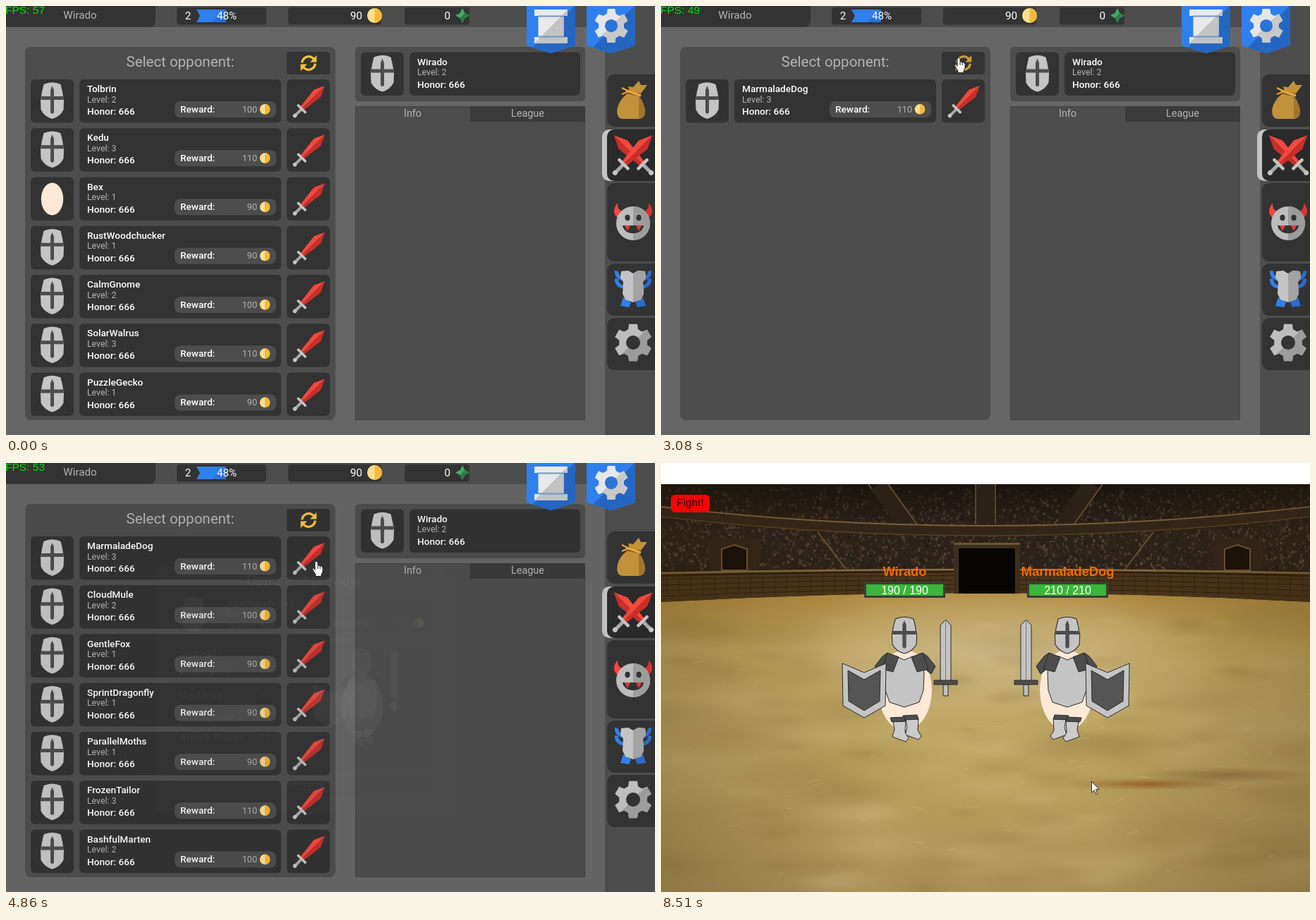
These frames come from a looping animation (920 by 608 pixels, 8590 ms). An HTML page with a canvas:

```html
<!DOCTYPE html>
<html lang="en">
<head>
<meta charset="utf-8">
<title>Arena</title>
<style>
html, body { margin: 0; width: 100%; height: 100%; overflow: hidden; background: #666; }
canvas { display: block; width: 920px; height: 608px; }
</style>
</head>
<body>
<canvas id="stage" width="920" height="608"></canvas>
<script>
const LOOP = 8590, TAU = Math.PI * 2;
const CLEAR = 2700, REFILL = 3080, OPEN = 4800, FIGHT = 7810;
const ROBOTO = 'Roboto, sans-serif', ARIAL = '"Liberation Sans", Arial, sans-serif';
const DARK = '#333', MID = '#4d4d4d', BASE = '#666', STEEL = '#c4c4c4', SOFT = '#b3b3b3', CREAM = '#fde9d6';
const RED = '#f4493d', BLUE = '#2f80ed', DEEP = '#2566c2';
const HERO = 'Wirado';

const roster = text => text.split(' ').map(entry => {
  const [name, level] = entry.split(':');
  return { name, level: +level };
});
const listA = roster('Tolbrin:2 Kedu:3 Bex:1 RustWoodchucker:1 CalmGnome:2 SolarWalrus:3 PuzzleGecko:1');
const listB = roster('MarmaladeDog:3 CloudMule:2 GentleFox:1 SprintDragonfly:1 ParallelMoths:1 FrozenTailor:3 BashfulMarten:2');
listA[2].egg = true;
const foe = listB[0];
const stats = { Strength: 5, Endurance: 11, Dexterity: 11, Intelligence: 7, 'Attack Power': 25, Health: 210 };

// Pointer glides: start, end, goal x, goal y, sideways bow
const glides = [
  [520, 1230, 546, 443, 0], [1230, 1530, 480, 247, 0], [1770, 2470, 422, 73, 0], [3880, 4630, 440, 139, 4],
  [5720, 6020, 480, 162, 0], [6020, 6660, 458, 352, 28], [6820, 7500, 480, 456, 8], [8060, 8510, 610, 451, 0]
];
const rates = [[0, 57], [1690, 50], [3080, 49], [4780, 53], [6020, 41], [7730, 38], [LOOP, 38]];

const view = document.getElementById('stage').getContext('2d');
let c = view;

function box(x, y, w, h, fill, r = 0) {
  c.fillStyle = fill;
  c.beginPath();
  c.roundRect(x, y, w, h, r);
  c.fill();
}
function txt(s, x, y, size, color = '#fff', align = 'left', font = ROBOTO, weight = 400) {
  c.font = `${weight} ${size}px ${font}`;
  c.textAlign = align;
  c.fillStyle = color;
  c.fillText(s, x, y);
}
const strong = (s, x, y, size = 13.6) => txt(s, x, y, size, '#fff', 'left', ROBOTO, 500);
function shape(...p) {
  c.beginPath();
  for (let i = 0; i < p.length; i += 2) c.lineTo(p[i], p[i + 1]);
  c.closePath();
}
// Symmetric path about x, from the points of its right half
function sym(x, ...half) {
  c.beginPath();
  for (let i = 0; i < half.length; i += 2) c.lineTo(x + half[i], half[i + 1]);
  for (let i = half.length - 2; i >= 0; i -= 2) c.lineTo(x - half[i], half[i + 1]);
  c.closePath();
}
function paint(fill) {
  c.fillStyle = fill;
  c.fill();
}
function ink(fill) {
  paint(fill);
  c.strokeStyle = '#2b2b2b';
  c.lineWidth = 1;
  c.stroke();
}
function poly(fill, ...p) {
  shape(...p);
  paint(fill);
}
function oval(x, y, rx, ry, fill) {
  c.beginPath();
  c.ellipse(x, y, rx, ry, 0, 0, TAU);
  paint(fill);
}
function line(color, w, ...p) {
  c.strokeStyle = color;
  c.lineWidth = w;
  c.beginPath();
  for (let i = 0; i < p.length; i += 2) c.lineTo(p[i], p[i + 1]);
  c.stroke();
}
function at(x, y, sx, sy, draw, turn = 0) {
  c.save();
  c.translate(x, y);
  c.scale(sx, sy);
  c.rotate(turn);
  draw();
  c.restore();
}
// Fill the path light, then its part right of x dark; lean slants the border.
function twoTone(light, dark, x, y, lean = 0) {
  c.save();
  paint(light);
  c.clip();
  poly(dark, x + 80 * lean, y - 80, x + 160, y - 80, x + 160, y + 80, x - 80 * lean, y + 80);
  c.restore();
}

function coin(x, y, r) {
  c.beginPath();
  c.arc(x, y, r, 0, TAU);
  twoTone('#ffdf8c', '#f6b93b', x, y);
}
function helm(outline) {
  c.beginPath();
  c.moveTo(-12, 3);
  c.quadraticCurveTo(0, -2.5, 12, 3);
  c.quadraticCurveTo(15, 14, 16.5, 26);
  c.lineTo(16, 39);
  c.quadraticCurveTo(11, 49, 0, 52);
  c.quadraticCurveTo(-11, 49, -16, 39);
  c.lineTo(-16.5, 26);
  c.quadraticCurveTo(-15, 14, -12, 3);
  c.closePath();
  if (outline === true) ink(STEEL);
  else paint(STEEL);
  sym(0, 15.5, 20, 16.3, 25);
  paint(MID);
  sym(0, 0, 5, 2.5, 11, 2.5, 43, 0, 45);
  paint(MID);
}
// Blade along the x axis, turned to point up right
function sword() {
  at(11.5, 51.5, 1, 1, () => {
    poly(RED, 15, 0, 15, -3.5, 45, -7, 60, 0);
    poly('#c92f2a', 15, 0, 15, 3.5, 45, 7, 60, 0);
    box(0, -2, 14, 4, '#a9a9a9', 1);
    box(12, -8.5, 3.5, 17, STEEL, 1);
    oval(0, 0, 2.8, 2.8, STEEL);
  }, -TAU / 8);
}
function gear(x, y, r, light, dark, hole) {
  c.beginPath();
  for (let i = 0; i < 6; i++) {
    const a = i * TAU / 6 - TAU / 4;
    for (const [da, k] of [[-0.36, 0.74], [-0.22, 1], [0.22, 1], [0.36, 0.74]])
      c.lineTo(x + Math.cos(a + da) * r * k, y + Math.sin(a + da) * r * k);
  }
  c.closePath();
  twoTone(light, dark, x, y, 1);
  oval(x, y, r * 0.37, r * 0.37, hole);
}
function ribbon(x) {
  sym(x, 34.5, 0, 34.5, 56, 0, 67);
  twoTone(BLUE, DEEP, x, 33, 1);
}
function refresh(x, y) {
  for (const turn of [0, Math.PI]) at(x, y, 1.08, 1.08, () => {
    c.strokeStyle = '#f8c23c';
    c.lineWidth = 3;
    c.beginPath();
    c.arc(0, 0, 8.6, Math.PI * 1.02, Math.PI * 1.78);
    c.stroke();
    poly('#f8c23c', 10.5, -10.5, 10.5, -1.5, 2, -1.5);
  }, turn);
}

function person(x, y, name, level) {
  strong(name, x, y + 18);
  txt('Level: ' + level, x, y + 32.5, 12.3, SOFT);
  strong('Honor: 666', x, y + 50);
}
function card(x, y, w, name, level, egg) {
  box(x, y, 61, 61.5, DARK, 6);
  if (egg) oval(x + 30.5, y + 31, 15.7, 23, CREAM);
  else at(x + 30.5, y + 4, 1, 1, helm);
  box(x + 69, y, w, 61.5, DARK, 6);
  person(x + 80, y, name, level);
}
function reward(x, y, level, size) {
  const k = size > 14 ? 1 : 0;
  box(x, y, 144, 23, MID, 8);
  strong('Reward:', x + 8, y + 15.5, size);
  txt(80 + level * 10, x + 117 + k * 2, y + 15.5, size - 1 + k, SOFT, 'right');
  coin(x + 128 + k * 2, y + 11.3, 7.2);
}
function row(y, who) {
  card(35, y, 286, who.name, who.level, who.egg);
  box(398, y, 61, 61.5, DARK, 6);
  reward(239, y + 31, who.level, 13.6);
  at(398, y, 1, 1, sword);
}

function topBar() {
  box(0, 0, 920, 30, MID);
  box(-10, -10, 222, 39.5, DARK, 8);
  txt(HERO, 105, 18, 15.2, SOFT, 'center');
  for (const [x, w] of [[242, 127], [400, 132], [565, 92]]) box(x, 2, w, 24.5, DARK, 4);
  shape(270, 5, 312, 5, 312, 23, 270, 23, 275, 14);
  twoTone(BLUE, '#2871d6', 301, 14, 1);
  txt('2', 258, 18.5, 15.2, '#fff', 'center');
  txt('48%', 313, 18.5, 15.2, '#fff', 'center');
  txt('90', 505, 18.5, 15.2, '#fff', 'right');
  txt('0', 630, 18.5, 15.2, '#fff', 'right');
  coin(522.5, 13.5, 10.5);
  sym(647, 0, 3, 3.5, 10, 10, 13.5, 3.5, 17, 0, 24);
  twoTone('#43a968', '#2c7d4b', 647, 13.5, 1);
  ribbon(772.5);
  sym(772.5, 23.5, 5, 23.5, 14, 18, 14, 18, 44, 23.5, 44, 23.5, 53);
  twoTone('#e9e9e9', '#c3c3c3', 772.5, 29, 1);
  for (const y of [14.5, 43.5]) line('#6f95cc', 2, 754, y, 791, y);
  ribbon(857.5);
  gear(858, 28, 24.5, '#e6e6e6', '#c8c8c8', '#2b74d8');
}

function bag() {
  c.beginPath();
  c.moveTo(881, 124);
  c.bezierCurveTo(864, 136, 861, 160, 875, 160);
  c.lineTo(897, 160);
  c.bezierCurveTo(911, 159, 906, 138, 897, 128);
  c.closePath();
  twoTone('#c1923a', '#a2762a', 897, 140);
  poly('#c1923a', 884, 121, 882, 114, 889, 115, 897, 106, 900, 112, 909, 112, 900, 124);
  line('#f0a435', 3.5, 879, 120, 900, 127);
  line('#f0a435', 2, 873, 125, 883, 121, 873, 116);
}
function devil() {
  for (const s of [1, -1]) at(889, 0, s, 1, () => {
    c.beginPath();
    c.moveTo(13, 292);
    c.quadraticCurveTo(23, 290, 22, 279);
    c.quadraticCurveTo(33, 293, 20, 302);
    c.closePath();
    paint(s > 0 ? '#d5352f' : RED);
  });
  c.beginPath();
  c.arc(889, 308, 24, 0, TAU);
  twoTone('#bdbdbd', '#9c9c9c', 889, 308);
  c.beginPath();
  c.moveTo(874, 311);
  c.lineTo(904, 311);
  c.bezierCurveTo(902, 326, 876, 326, 874, 311);
  paint(DARK);
  for (const s of [-1, 1]) {
    const x = 889 + s * 8;
    oval(x, 300, 3.6, 4.2, DARK);
    poly('#e53b33', x - 4, 311, x + 4, 311, x, 319);
  }
}
function armor() {
  for (const s of [1, -1]) at(889, 0, s, 1, () => {
    const blue = s > 0 ? '#2a6bcc' : BLUE;
    for (const y of [375, 386]) {
      c.beginPath();
      c.moveTo(26, y);
      c.quadraticCurveTo(27, y + 12, 13, y + 15);
      c.lineTo(13, y + 10);
      c.quadraticCurveTo(21, y + 8, 21, y + 1);
      paint(blue);
    }
    poly(blue, 3, 420, 14, 413, 18, 425, 6, 427);
  });
  sym(889, 0, 379, 7, 375, 17, 376, 18, 385, 14, 391, 15, 408, 11, 416, 0, 420);
  twoTone('#c4c4c4', '#a3a3a3', 889, 398);
}
function sideBar() {
  box(849, 30, 71, 578, MID);
  box(845, 175, 90, 73, STEEL, 10);
  for (const [y, h] of [[97, 74], [175, 73], [251, 111], [365, 74], [442, 74]])
    box(852, y, 90, h, h === 73 ? '#2a2a2a' : DARK, 10);
  bag();
  for (const s of [-1, 1]) at(889 - s * 40, 172, s * 1.25, 1.25, sword);
  devil();
  armor();
  gear(889, 477, 27, '#bdbdbd', '#9c9c9c', DARK);
}

function lobby(rows, hover) {
  box(0, 0, 920, 608, BASE);
  sideBar();
  box(27, 58, 440, 529, MID, 8);
  txt('Select opponent:', 247, 86, 20.5, SOFT, 'center');
  box(398, 65, 61, 32, DARK, 4);
  c.globalAlpha = hover ? 0.75 : 1;
  refresh(429, 81);
  c.globalAlpha = 1;
  rows.forEach((who, i) => row(104 + i * 69.25, who));
  box(495, 58, 326, 77, MID, 6);
  card(503, 65.5, 242, HERO, 2);
  box(495, 142, 326, 444.5, MID);
  c.strokeStyle = '#444';
  c.lineWidth = 1;
  c.strokeRect(495.5, 142.5, 325, 444);
  box(658, 142, 163, 22, '#3b3b3b');
  txt('Info', 576.5, 157, 14.4, SOFT, 'center');
  txt('League', 739.5, 157, 14.4, SOFT, 'center');
}

function knight(hand) {
  oval(1, 104, 38, 57, CREAM);
  sym(0, 0, 61, 12, 56, 26, 59, 28, 80, 27, 104, 21, 121, 0, 128);
  ink(STEEL);
  for (const s of [-1, 1]) at(1, 0, s, 1, () => {
    shape(25, 51, 32, 56, 43, 70, 37, 81, 28, 74);
    ink(MID);
    shape(9, 57, 25, 51, 33, 74, 17, 78);
    ink(MID);
  });
  at(0, 0, 1.07, 1, () => helm(true));
  // Boots, the far one first
  for (const [x, y] of [[18, -3], [0, 0]]) at(x, y, 1, 1, () => {
    shape(-16, 148, 2, 148, 1, 164, 6, 172, 2, 177, -17, 170, -14, 160);
    ink('#cbcbcb');
    shape(-20, 143, 0, 142, 2, 148, -18, 149);
    ink(MID);
  });
  sym(-57, 0, 79, 31, 66, 30, 126, 0, 143);
  ink(STEEL);
  sym(-57, 0, 89, 23, 76, 22, 119.5, 0, 133);
  ink('#555');
  sym(58.5, 0, 4, 7.5, 12, 7.5, 91);
  ink(STEEL);
  line('#777', 1, 58.5, 6, 58.5, 90);
  if (hand) oval(58.5, 105, 8.5, 8.5, '#e5c298');
  sym(58.5, 3.5, 96, 3.5, 112);
  ink('#bdbdbd');
  sym(58.5, 16.5, 90, 16.5, 96);
  ink(MID);
}

function popup() {
  box(212, 147, 424, 350.5, BASE, 6);
  box(591, 147, 45, 22, DARK, [0, 6, 0, 6]);
  txt('X', 614, 161.5, 15.5, '#f3a64a', 'center');
  txt('Opponent preview:', 424, 173, 20.2, '#fff', 'center');
  card(235, 185, 309, foe.name, foe.level);
  reward(455, 215, foe.level, 15);
  box(235, 254, 152, 183, DARK);
  box(395, 254, 218, 183, DARK);
  Object.entries(stats).forEach(([label, value], i) => {
    const y = 273 + i * 30.4;
    txt(label + ':', 246, y, 15.2);
    txt(value, 376, y, 15.2, SOFT, 'right');
  });
  at(504, 262, 0.79, 0.79, () => knight(true));
  box(235, 444, 378, 31, DARK, 6);
  txt('Attack', 424, 464, 20.2, SOFT, 'center');
}

function random(seed) {
  return () => (seed = (seed * 16807) % 2147483647) / 2147483647;
}
function blend(g, ...colors) {
  colors.forEach((color, i) => g.addColorStop(i / (colors.length - 1), color));
  return g;
}
// Line across the stage, bowed from the edge height to the middle height
function curve(color, w, edge, mid) {
  c.strokeStyle = color;
  c.lineWidth = w;
  c.beginPath();
  c.moveTo(0, edge);
  c.quadraticCurveTo(460, 2 * mid - edge, 920, edge);
  c.stroke();
}
function glow(x, y, r, flat, tone, alpha) {
  const g = blend(c.createRadialGradient(0, 0, 0, 0, 0, r), `rgba(${tone},${alpha})`, `rgba(${tone},0)`);
  at(x, y, 1, flat, () => box(-r, -r, 2 * r, 2 * r, g));
}
function sand(rnd) {
  box(0, 150, 920, 458, blend(c.createLinearGradient(0, 180, 0, 608),
    '#b08a3e', '#c0a45c', '#c0a866', '#b8a05e', '#b0985a', '#a89156'));
  glow(470, 265, 330, 0.3, '208,194,160', 0.6);
  for (let i = 0; i < 150; i++) {
    const tone = rnd() < 0.5 ? '122,94,42' : '226,206,152';
    glow(rnd() * 920, 215 + rnd() * 390, 25 + rnd() * 85, 0.3, tone, 0.13);
  }
  glow(690, 455, 110, 0.08, '140,78,24', 0.7);
  glow(800, 442, 120, 0.1, '120,80,34', 0.5);
  for (let i = 0; i < 70; i++) {
    const x = rnd() * 920, y = 280 + rnd() * 320;
    line('rgba(222,206,160,.3)', 1, x, y, x + 4 + rnd() * 14, y - 5 + rnd() * 7);
  }
}
function stands(rnd) {
  c.beginPath();
  c.moveTo(0, 30);
  c.lineTo(0, 197);
  c.quadraticCurveTo(460, 171, 920, 197);
  c.lineTo(920, 30);
  paint('#2c2219');
  for (let i = 0; i < 3600; i++) {
    const light = 10 + rnd() * 18;
    box(rnd() * 920, 34 + rnd() * 116, 1.5 + rnd() * 2.5, 2 + rnd() * 3, `hsl(${20 + rnd() * 14} 22% ${light}%)`);
  }
  box(0, 30, 920, 65, blend(c.createLinearGradient(0, 30, 0, 95), 'rgba(15,10,6,.6)', 'rgba(15,10,6,0)'));
  for (const s of [-1, 0, 1]) {
    const x = 460 + s * 152;
    for (const w of [-14, 0, 14]) line(w ? '#6b5130' : '#2b2117', w ? 1.5 : 26, x + w, 30, x + w - s * 40, 86);
    if (s) line('#6b5130', 2, 460 + s * 238, 98, 460 + s * 198, 150);
  }
  curve('#33261a', 13, 70, 97);
  curve('#7d6038', 2, 62, 89);
  curve('#57411f', 1.5, 76, 103);
  c.beginPath();
  c.moveTo(0, 156);
  c.quadraticCurveTo(460, 146, 920, 156);
  c.lineTo(920, 197);
  c.quadraticCurveTo(460, 171, 0, 197);
  paint('#4a351c');
  for (let i = 0; i < 4; i++) curve('rgba(20,12,5,.5)', 1, 165 + i * 8, 159 + i * 6.5);
  for (let x = 8; x < 920; x += 17) line('rgba(20,12,5,.4)', 1, x, 158, x, 186);
  curve('#8a6b3e', 2.5, 156, 151);
  curve('#2a1c0e', 2, 160, 154);
  for (const x of [104, 817]) {
    sym(x, 26, 107, 38, 112, 34, 152);
    paint('#32261a');
    sym(x, 0, 116, 18, 122, 18, 152);
    paint('#171009');
    c.strokeStyle = '#6e5533';
    c.lineWidth = 2;
    c.stroke();
  }
  box(415, 113, 94, 72, '#3d2f1e');
  box(415, 113, 94, 3, '#6b5433');
  box(422, 121, 80, 64, '#080604');
}
function arena() {
  const rnd = random(41);
  sand(rnd);
  stands(rnd);
  box(0, 30, 920, 578, blend(c.createLinearGradient(0, 0, 920, 0),
    'rgba(50,32,8,.22)', 'rgba(50,32,8,0)', 'rgba(50,32,8,0)', 'rgba(50,32,8,.22)'));
  box(0, 0, 920, 30, '#fff');
  box(14, 45, 55, 25, '#f00', 6);
  txt('Fight!', 41.5, 61, 15.3, '#260000', 'center', ARIAL);
  for (const [x, dir, name, hp] of [[345, 1, HERO, 190], [576, -1, foe.name, 210]]) {
    at(x, 218, dir, 1, () => knight(false));
    txt(name, x + 0.5, 160, 18.4, '#f56a05', 'center', ARIAL, 700);
    box(x - 57, 169, 115, 22, '#3a4038');
    box(x - 54, 172, 109, 16, '#3bb53a');
    txt(hp + ' / ' + hp, x + 0.5, 185.5, 16, '#fff', 'center', ARIAL);
  }
}

const clamp = k => Math.min(1, Math.max(0, k));
const ease = k => k * k * (3 - 2 * k);

function pointer(t) {
  let x = 916, y = 598;
  for (const [from, to, gx, gy, bow] of glides) {
    if (t < from) break;
    const k = ease(clamp((t - from) / (to - from)));
    x += (gx - x) * k + bow * Math.sin(k * Math.PI);
    y += (gy - y) * k;
  }
  return [Math.round(x), Math.round(y)];
}
// Frame rate drifts between key values with a wobble that fades at each key.
function rate(t) {
  const i = rates.findIndex(r => r[0] > t), [t0, v0] = rates[i - 1], [t1, v1] = rates[i];
  const step = Math.floor((t - t0) / 78), k = step * 78 / (t1 - t0);
  return Math.round(v0 + (v1 - v0) * k + 2 * Math.sin(k * Math.PI) * Math.sin(step * 2.4));
}
const inside = (x, y, l, top, w, h) => x > l && x < l + w && y > top && y < top + h;

function overLink(t, x, y, count) {
  if (t >= FIGHT) return t < 8130;
  if (t > OPEN + 140) return inside(x, y, 235, 444, 378, 31);
  return inside(x, y, 398, 65, 61, 32) || inside(x, y, 852, 97, 68, 419) ||
    inside(x, y, 398, 104, 61, count * 69.25) && (y - 104) % 69.25 < 61.5;
}
function drawCursor(x, y, hand) {
  c.lineJoin = 'round';
  at(x, y, 1, 1, () => {
    if (hand) {
      shape(-1.5, 0.5, 1, 0.5, 2, 2, 2, 6, 7, 7, 9, 9, 9, 15, 7, 19, 7, 21.5,
        -1, 21.5, -1, 19, -6, 11, -4.5, 10, -2, 12.5, -2, 2);
      ink('#fff');
      for (const fx of [2, 5.2]) line('#222', 1, fx, 6.5, fx, 11);
    } else {
      shape(0.5, 0.5, 0.5, 16, 4, 12.6, 6.5, 18.4, 8.7, 17.4, 6.3, 11.7, 11, 11.7);
      ink('#fff');
    }
  });
}

const backdrop = document.createElement('canvas');
backdrop.width = 920;
backdrop.height = 608;
c = backdrop.getContext('2d');
arena();
c = view;

function draw(t) {
  const [x, y] = pointer(t);
  const rows = t < CLEAR ? listA : listB.slice(0, Math.max(0, Math.ceil((t - REFILL + 1) / 66)));
  if (t >= FIGHT) {
    c.drawImage(backdrop, 0, 0);
  } else {
    lobby(rows, t < OPEN && inside(x, y, 398, 65, 61, 32));
    const fade = ease(clamp((t - OPEN) / 480));
    if (fade > 0) {
      c.globalAlpha = fade;
      box(0, 30, 849, 578, 'rgba(0,0,0,.69)');
      popup();
      c.globalAlpha = 1;
    }
    topBar();
    txt('FPS: ' + rate(t), -1, 11, 15.5, '#00e000', 'left', ARIAL);
  }
  if (t >= glides[0][0]) drawCursor(x, y, overLink(t, x, y, rows.length));
}

let start;
function tick(now) {
  start ??= now;
  draw(Math.max(0, now - start) % LOOP);
  requestAnimationFrame(tick);
}
requestAnimationFrame(tick);
</script>
</body>
</html>
```
